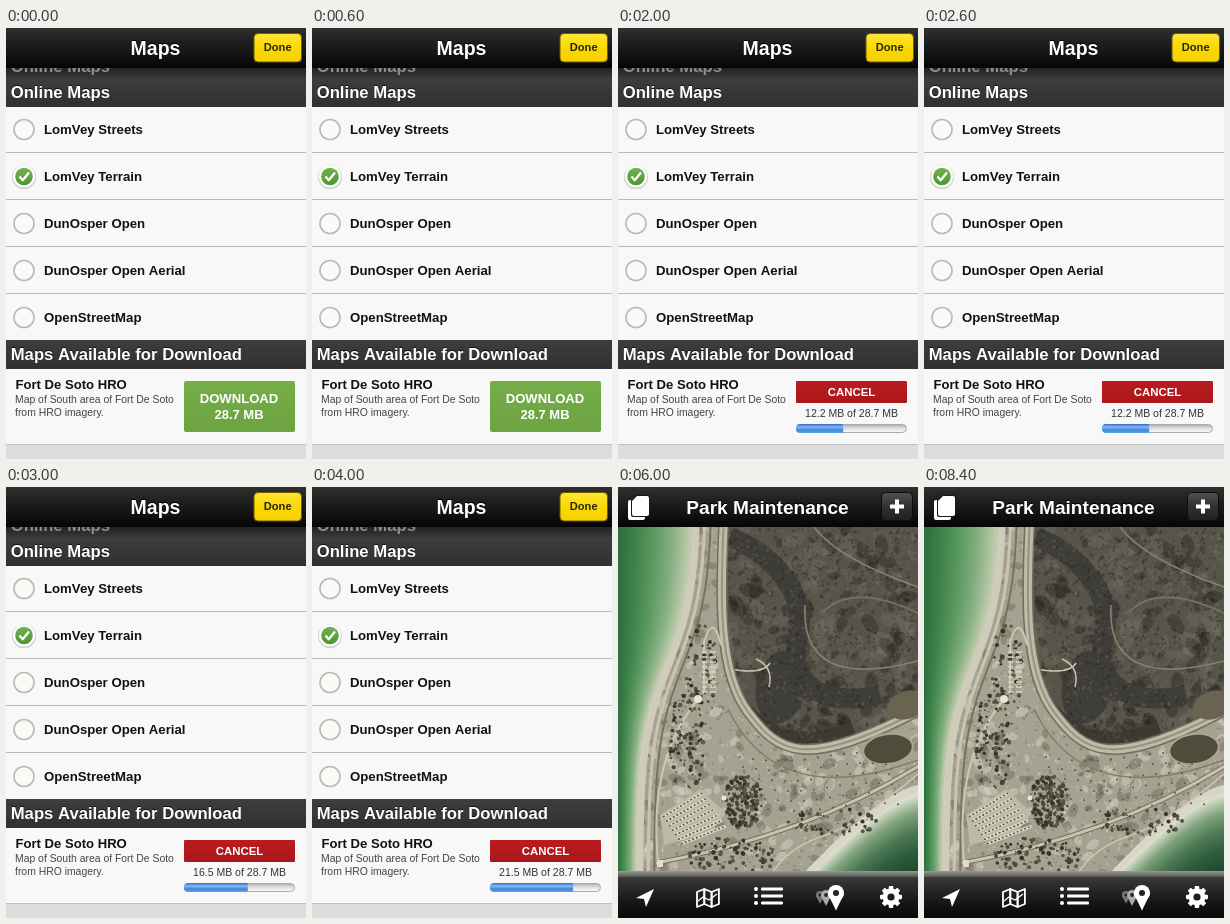
An HTML page with a canvas for the animation above (10000 ms loop, 300 by 431 pixels).

```html
<!DOCTYPE html>
<html lang="en">
<head>
<meta charset="utf-8">
<title>Maps</title>
<style>
html, body { margin: 0; width: 100%; height: 100%; overflow: hidden; background: #000; }
canvas { display: block; width: 300px; height: 431px; }
</style>
</head>
<body>
<canvas id="stage" width="300" height="431"></canvas>
<script>
const W = 300, H = 431, LOOP = 10000, ROW = 47, TOTAL = 28.7;
const received = [0, 2.5, 12.2, 16.5, 21.5, 23.6];
const layers = ['LomVey Streets', 'LomVey Terrain', 'DunOsper Open', 'DunOsper Open Aerial', 'OpenStreetMap'];
let ctx = document.getElementById('stage').getContext('2d');

function gradient(x0, y0, x1, y1, colors) {
  const g = ctx.createLinearGradient(x0, y0, x1, y1);
  colors.forEach((c, i) => g.addColorStop(i / (colors.length - 1), c));
  return g;
}
const vertical = (y0, y1, ...colors) => gradient(0, y0, 0, y1, colors);

function box(x, y, w, h, color, r = 0, edge) {
  ctx.beginPath();
  ctx.roundRect(x, y, w, h, r);
  if (color) { ctx.fillStyle = color; ctx.fill(); }
  if (edge) { ctx.strokeStyle = edge; ctx.lineWidth = 1; ctx.stroke(); }
}

function oval(x, y, rx, ry, color, tilt = 0) {
  ctx.beginPath();
  ctx.ellipse(x, y, rx, ry, tilt, 0, Math.PI * 2);
  ctx.fillStyle = color;
  ctx.fill();
}
const disc = (x, y, r, color) => oval(x, y, r, r, color);

function fill(path, color) {
  ctx.fillStyle = color;
  ctx.fill(new Path2D(path));
}

function line(path, color, width, dash = []) {
  ctx.strokeStyle = color;
  ctx.lineWidth = width;
  ctx.lineJoin = 'round';
  ctx.setLineDash(dash);
  ctx.stroke(new Path2D(path));
  ctx.setLineDash([]);
}

function label(str, x, y, size, color, { bold = true, align = 'left', shade } = {}) {
  ctx.font = `${bold ? 'bold ' : ''}${size}px "Liberation Sans", Arial, sans-serif`;
  ctx.textAlign = align;
  if (shade) { ctx.fillStyle = shade; ctx.fillText(str, x, y - 1); }
  ctx.fillStyle = color;
  ctx.fillText(str, x, y);
}

function titleBar(title, size) {
  box(0, 0, W, 40, vertical(0, 40, '#303030', '#202020', '#131313', '#050505'));
  label(title, 149.5, 26.5, size, '#fff', { align: 'center', shade: '#000' });
}

function section(title, y) {
  box(0, y, W, 29, vertical(y, y + 29, '#3e3e3e', '#303030'));
  label(title, 4.7, y + 20, 16.7, '#fff', { shade: '#111' });
}

function radio(x, y, checked) {
  if (!checked) {
    disc(x, y, 10.8, '#b9b9b9');
    disc(x, y, 9.2, '#fafaf6');
    return;
  }
  disc(x, y + .8, 12, '#d2d2d2');
  disc(x, y, 11, '#fff');
  disc(x, y, 8.8, vertical(y - 9, y + 9, '#74b352', '#4d952f'));
  line(`M${x - 4.5} ${y}l3.2 3.7l6.3 -7.7`, '#fff', 2.3);
}

function progress(mb) {
  box(178, 353, 111, 22, vertical(353, 375, '#b91c20', '#ab171a'), 1);
  label('CANCEL', 233.5, 367.5, 11.4, '#fff', { align: 'center' });
  label(`${mb} MB of ${TOTAL} MB`, 233.5, 389, 10.5, '#333', { bold: false, align: 'center' });
  box(178.5, 396.5, 110, 8, vertical(396, 405, '#aaa', '#e0e0e0', '#fff'), 4, '#aaa');
  box(178, 396, 111 * mb / TOTAL, 9, vertical(396, 405, '#2f69bd', '#8bb9ef', '#3f86dd', '#5ba6f3'), [4, 1, 1, 4]);
}

function drawList(step) {
  box(0, 0, W, H, '#f8f8f8');
  box(0, 40, W, 10, vertical(40, 50, '#222', '#383838'));
  label('Online Maps', 4.7, 44, 16.7, '#8c8c8c');
  section('Online Maps', 50);
  titleBar('Maps', 19.5);
  box(248, 5.5, 47.5, 28.5, vertical(6, 34, '#ffe535', '#fbd800', '#f6d000'), 4, '#6d5c00');
  label('Done', 271.7, 23, 11.1, '#28250c', { align: 'center' });

  layers.forEach((name, i) => {
    const y = 78 + i * ROW;
    box(0, y + 46, W, 1, '#bcbcbc');
    radio(18, y + 23.5, i === 1);
    label(name, 38, y + 27.7, 13.2, '#111');
  });

  section('Maps Available for Download', 312);
  box(0, 416, W, 15, '#dcdcdc');
  box(0, 416, W, 1, '#c0c0c0');
  label('Fort De Soto HRO', 9.5, 361, 13.1, '#111');
  label('Map of South area of Fort De Soto', 9, 375, 10.4, '#444', { bold: false });
  label('from HRO imagery.', 9, 388, 10.4, '#444', { bold: false });
  if (step) progress(received[step]);
  else {
    box(178, 353, 111, 51, vertical(353, 404, '#75ad49', '#6da341'), 2);
    label('DOWNLOAD', 233, 375, 13.1, '#fff', { align: 'center' });
    label(`${TOTAL} MB`, 233, 391, 13, '#fff', { align: 'center' });
  }
}

// Shorelines of the aerial view: x for a given y, and y for a given x.
const westShore = y => 17 + 58 / (1 + Math.exp((y - 178) / 38));
const southShore = x => 307 + 81 * Math.max(0, (W - x) / 108) ** 1.4;

function alongWest(offset) {
  let path = 'M';
  for (let y = 40; y <= 390; y += 10) path += `${westShore(y) + offset} ${y} `;
  return path;
}

function drawAerial() {
  let seed = 7;
  const rnd = () => (seed = seed * 16807 % 2147483647) / 2147483647;
  const pick = list => list[Math.floor(rnd() * list.length)];

  function mottle(n, x, y, w, h, size, colors) {
    for (let i = 0; i < n; i++) {
      const r = size * (.3 + rnd());
      oval(x + rnd() * w, y + rnd() * h, r, r * .6, pick(colors), rnd() * 3);
    }
  }
  function grove(n, x, y, rx, ry) {
    for (let i = 0; i < n; i++) {
      const a = rnd() * Math.PI * 2, d = Math.sqrt(rnd());
      disc(x + Math.cos(a) * d * rx, y + Math.sin(a) * d * ry, .6 + rnd() * 1.8, pick(['#35342a', '#4a4737', '#5c5846']));
    }
  }

  ctx.save();
  box(0, 40, W, 349, '#a5a291');
  ctx.clip();
  const sand = ['rgba(80,76,60,.3)', 'rgba(225,221,203,.4)'];
  mottle(500, 0, 40, W, 349, 6, sand);
  mottle(2200, 0, 40, W, 349, 1.5, sand);

  // Marsh, bounded by the main road
  const road = 'M106 30C102 110 100 185 130 225S185 285 304 222';
  const marsh = ['rgba(35,34,28,.35)', 'rgba(130,126,110,.22)'];
  ctx.save();
  ctx.clip(new Path2D(road + 'V30Z'));
  box(100, 40, 200, 240, '#57544a');
  mottle(250, 105, 40, 195, 230, 9, marsh);
  oval(163, 200, 25, 37, '#403e39', .2);
  line('M112 50C160 70 190 110 180 150S195 222 262 208', '#3f3d39', 20);
  line('M122 215Q165 270 235 240', '#3c3a31', 12);
  mottle(2200, 105, 40, 195, 230, 1.8, marsh);
  line('M196 40Q220 72 300 100M187 118Q182 205 300 174', '#85816f', 1.6);
  line('M205 125Q235 95 300 126', '#747060', 2);
  line('M112 182Q145 188 152 176M138 172Q156 180 151 200', '#c5c1ac', 1.5);
  ctx.restore();

  // Beach tracks and water
  line(alongWest(4), '#cfcdb9', 8);
  line(alongWest(19), '#77735f', 2);
  line(alongWest(13), '#c9c5b1', 3);
  for (let y = 40; y < 390; y++) {
    const x = westShore(y);
    box(0, y, x, 1, gradient(0, 0, x, 0, ['#2d6e3d', '#3f844b', '#5d9a61', '#87b083', '#c3cdb0']));
  }
  for (let x = 185; x < W; x++) {
    const y = southShore(x);
    box(x, y - 9, 1, 10, '#d8d6c6');
    box(x, y, 1, 100, gradient(0, y, 0, y + 75, ['#dfe3d3', '#7fa37c', '#4d7a54', '#2f5c3e', '#214b30']));
  }

  // Roads and paths
  line(road, '#716d5c', 11);
  line(road, '#bfbba8', 8);
  line(road, '#98937f', 2);
  line('M38 376Q190 348 304 277', '#77725f', 5);
  line('M38 376Q190 348 304 277', '#c8c4b0', 3);
  line('M110 222Q160 325 300 273', '#827d69', 1.5);
  line('M86 207V155Q95 125 103 158M82 210Q30 270 40 375', '#cbc7b3', 2);
  line('M152 389Q170 360 205 349T300 287', '#cbc7b3', 1.5);

  // Pond, groves and parking rows
  oval(270, 262, 26, 16, '#aaa690', -.15);
  oval(270, 262, 24, 14, '#504c3b', -.15);
  oval(289, 218, 20, 14, '#68644f', -.3);
  grove(220, 125, 315, 19, 27);
  grove(110, 69, 255, 18, 52);
  grove(60, 83, 185, 16, 55);
  grove(110, 115, 370, 45, 20);
  grove(60, 215, 335, 45, 14);
  for (let r = 0; r < 6; r++)
    for (let i = 0; i < 12; i++)
      disc(122 + i * 13 + r * 3, 270 + r * 10 + Math.sin(i / 2) * 4, 1, '#5d5945');
  fill('M42 328L82 302L108 326L92 346L46 358Z', '#bdb9a6');
  for (let i = 0; i < 7; i++) {
    const row = `M${45 + i * 3} ${330 + i * 4.5}l${39 + i} ${-24 + i}`;
    line(row, '#dedac8', 3);
    line(row, '#57533f', 1.5, [2, 2]);
  }
  for (let y = 165; y < 210; y += 5) line(`M84 ${y}h5m3 0h6`, '#d9d5c2', 1.5);
  disc(80, 212, 4, '#e7e5d9');
  disc(106, 311, 2.5, '#e7e5d9');
  box(39, 373, 6, 7, '#e1ddcc');
  ctx.restore();

  titleBar('Park Maintenance', 19.1);
  box(263.5, 5.5, 31, 28, vertical(6, 34, '#505050', '#303030', '#202020'), 4, '#0c0c0c');
  line('M279 12.5v14M272 19.5h14', '#fff', 4);
  box(10, 13, 17, 20, '#fff', 2);
  fill('M18 8H29Q32 8 32 11V28Q32 30 30 30H15Q13 30 13 28V13Z', '#181818');
  fill('M19 9H29Q31 9 31 11V27Q31 29 29 29H16Q14 29 14 27V14Z', '#fff');
  drawToolbar();
}

function pin(x, y, r, color) {
  fill(`M${x - r} ${y + 1}h${r * 2}L${x} ${y + r * 2.2}Z`, color);
  disc(x, y, r, color);
  disc(x, y, r * .38, '#222');
}

function drawToolbar() {
  box(0, 384, W, 6, vertical(384, 390, '#9a9a94', '#555'));
  box(0, 390, W, 41, vertical(390, 431, '#3a3a3a', '#262626', '#141414', '#080808'));
  fill('M18 411L36 402L28 420L26 412Z', '#fff');

  for (let i = 0; i < 3; i++) {
    const tilt = i % 2 ? 3 : -3;
    line(`M${79 + i * 7.3} ${402 - Math.min(0, tilt)}l7.3 ${tilt}v15l-7.3 ${-tilt}z`, '#fff', 1.8);
  }
  line('M80 414l5 -4l6 3l8 -6', '#fff', 1.3);

  for (let y = 402; y <= 416; y += 7) {
    disc(138, y, 2, '#fff');
    box(143, y - 1.5, 22, 3, '#fff', 1);
  }

  pin(202, 408, 4, '#777');
  pin(208, 408, 5, '#aaa');
  pin(218, 406, 8, '#fff');

  ctx.save();
  ctx.translate(273, 410);
  for (let i = 0; i < 8; i++) {
    box(-2.3, -11, 4.6, 6, '#fff', 1);
    ctx.rotate(Math.PI / 4);
  }
  disc(0, 0, 8.5, '#fff');
  disc(0, 0, 3.6, '#1c1c1c');
  ctx.restore();
}

const screen = ctx;
const aerial = document.createElement('canvas');
aerial.width = W;
aerial.height = H;
ctx = aerial.getContext('2d');
drawAerial();
ctx = screen;

function frame() {
  const step = Math.min(6, Math.floor(performance.now() % LOOP / 1000));
  if (step === 6) ctx.drawImage(aerial, 0, 0);
  else drawList(step);
  requestAnimationFrame(frame);
}
frame();
</script>
</body>
</html>
```
